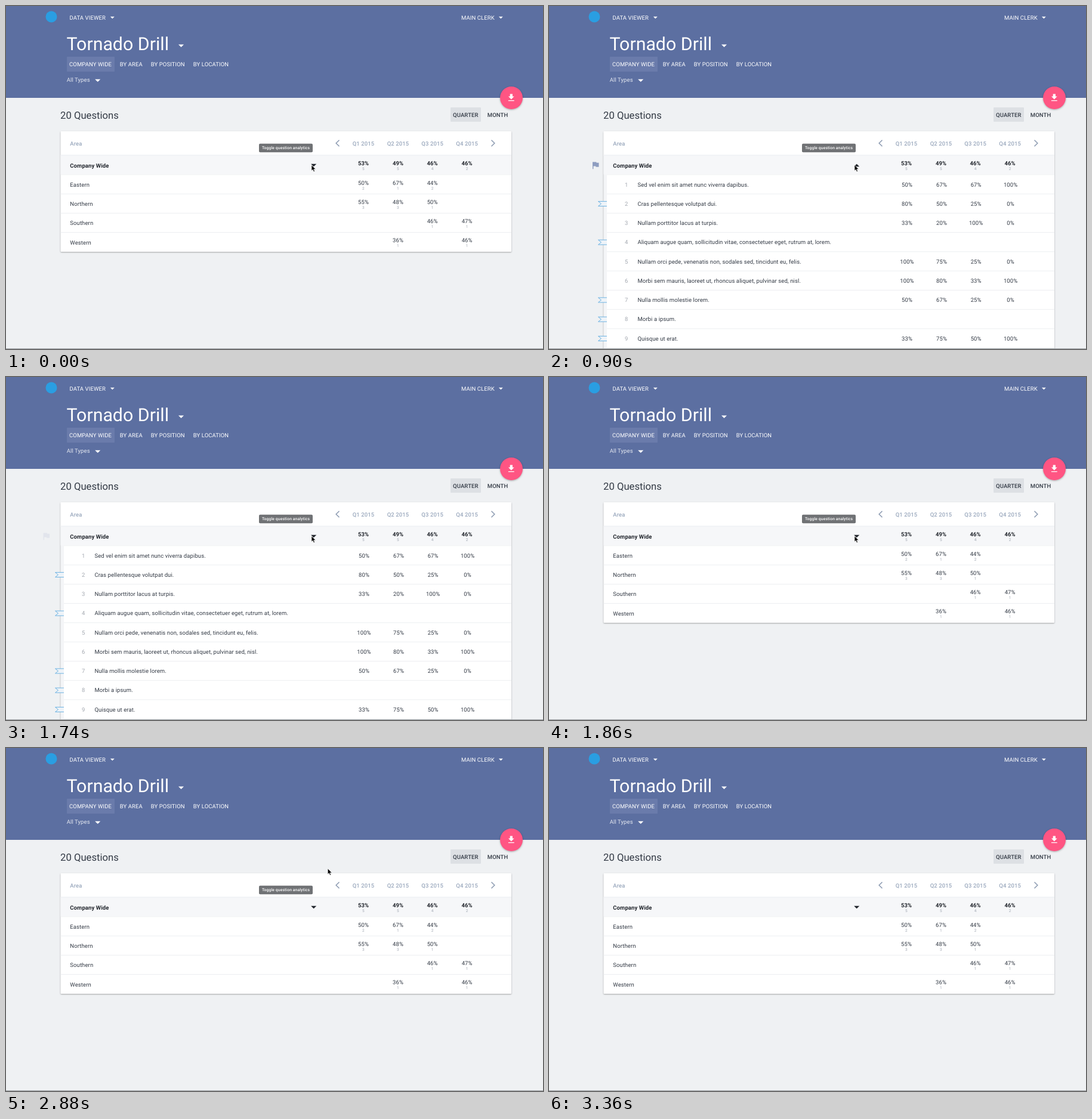
Animation, 900 px wide and 575 px high, one loop 3390 ms. Source, as an HTML page:

```html
<!DOCTYPE html>
<html lang="en">
<head>
<meta charset="utf-8">
<title>Data viewer</title>
<style>
  html, body { margin: 0; width: 100%; height: 100%; overflow: hidden; background: #eff1f3; }
  svg { display: block; width: 900px; height: 575px; }
  text { font: 9.5px Roboto, sans-serif; letter-spacing: .1px; fill: #343b46; text-rendering: geometricPrecision; }
  text.light { fill: #fff; }
  text.soft { fill: #e3e7f0; }
  text.muted { fill: #9aa8bd; font-weight: 500; }
  text.index { fill: #a3a8b0; }
  text.bold { font-weight: 700; fill: #23272e; }
  text.medium { font-weight: 500; }
  text.count { font-size: 6.5px; fill: #a0a7b2; }
  text.title { font-size: 30.3px; letter-spacing: 0; fill: #fff; }
  text.heading { font-size: 16.7px; letter-spacing: 0; }
  text.tip { font-size: 6.8px; font-weight: 500; fill: #fff; }
  .card { filter: drop-shadow(0 1px 1px rgba(0, 0, 0, .32)); }
  .fab { filter: drop-shadow(0 1.5px 1.5px rgba(0, 0, 0, .3)); }
</style>
</head>
<body>
<svg id="stage" viewBox="0 0 900 575"></svg>
<script>
const LOOP = 3390;
const COLUMNS = [599, 657, 714.6, 772.6];
const PITCH = 32.27;

const AREAS = [
  ['Eastern', '50% 2', '67% 1', '44% 2', ''],
  ['Northern', '55% 3', '48% 3', '50% 1', ''],
  ['Southern', '', '', '46% 1', '47% 1'],
  ['Western', '', '36% 1', '', '46% 1'],
];
const QUESTIONS = [
  ['Sed vel enim sit amet nunc viverra dapibus.', '50% 67% 67% 100%'],
  ['Cras pellentesque volutpat dui.', '80% 50% 25% 0%', true],
  ['Nullam porttitor lacus at turpis.', '33% 20% 100% 0%'],
  ['Aliquam augue quam, sollicitudin vitae, consectetuer eget, rutrum at, lorem.', '', true],
  ['Nullam orci pede, venenatis non, sodales sed, tincidunt eu, felis.', '100% 75% 25% 0%'],
  ['Morbi sem mauris, laoreet ut, rhoncus aliquet, pulvinar sed, nisl.', '100% 80% 33% 100%'],
  ['Nulla mollis molestie lorem.', '50% 67% 25% 0%', true],
  ['Morbi a ipsum.', '', true],
  ['Quisque ut erat.', '33% 75% 50% 100%', true],
];

const text = (x, y, str, cls = '', anchor = 'start') =>
  `<text x="${x}" y="${y}" class="${cls}" text-anchor="${anchor}">${str}</text>`;
const rect = (x, y, w, h, fill, more = '') =>
  `<rect x="${x}" y="${y}" width="${w}" height="${h}" fill="${fill}" ${more}/>`;
const path = (d, fill, more = '') => `<path d="${d}" fill="${fill}" ${more}/>`;
const caret = (x, y, r, fill, more = '') => path(`M${x - r} ${y - r / 2}h${2 * r}l${-r} ${r}z`, fill, more);
const separator = (x, row) => rect(x, 250 + PITCH * row, 847 - x, 1, '#eceef1');
const chevron = (x, dx) => path(`M${x} 224.7l${dx} 5.3l${-dx} 5.3`, 'none', 'stroke="#8f9db3" stroke-width="1.6"');

// A percentage with its small count below
const scores = (cells, row, cls = '') => cells.map((cell, i) => {
  if (!cell) return '';
  const [percent, count] = cell.split(' ');
  const y = 267.3 + PITCH * row;
  return text(COLUMNS[i], y, percent, cls, 'middle') + text(COLUMNS[i], y + 8.1, count, 'count', 'middle');
}).join('');

const header = () => rect(0, 0, 900, 154, '#5c6fa1') +
  '<circle cx="76" cy="18" r="9.5" fill="#2a9ee2"/>' +
  text(106.5, 23, 'DATA VIEWER', 'light') + caret(178.3, 19.5, 3.5, '#fff') +
  text(763, 23, 'MAIN CLERK', 'light') + caret(829.3, 19.5, 3.5, '#fff') +
  text(101.5, 74.2, 'Tornado Drill', 'title') + caret(293.5, 66.7, 4.6, '#fff') +
  rect(102, 85, 80, 25, '#6a7bab', 'rx="1"') +
  text(106, 101, 'COMPANY WIDE', 'light') + text(190.7, 101, 'BY AREA', 'light') +
  text(242.7, 101, 'BY POSITION', 'light') + text(313.7, 101, 'BY LOCATION', 'light') +
  text(101.7, 127.4, 'All Types', 'soft') + caret(153.7, 125, 4.6, '#fff') +
  '<circle class="fab" cx="847" cy="154" r="19" fill="#ff5583"/>' +
  path('M19 9h-4V3H9v6H5l7 7 7-7zM5 18v2h14v-2z', '#fff', 'transform="translate(838.4 145.3) scale(.7)"');

const toolbar = () => text(91, 189, '20 Questions', 'heading') +
  rect(745, 170, 51, 24, '#dde0e4', 'rx="1"') +
  text(770.3, 186, 'QUARTER', 'medium', 'middle') + text(824, 186, 'MONTH', 'medium', 'middle');

const areaRows = () => rect(91.5, 210, 755.5, 202, '#fff', 'class="card" rx="1"') +
  AREAS.map(([name, ...cells], i) => separator(91.5, i + 1) +
    text(107.3, 302.8 + PITCH * i, name) + scores(cells, i + 1)).join('');

const ribbon = y => path(`M97 ${y - 4}H82.5l5 4l-5 4H97`, '#eef3f8', 'stroke="#6db3e2"');

const questionRows = () => rect(91.5, 210, 755.5, 380, '#f4f5f7', 'class="card" rx="1"') +
  rect(91.5, 210, 755.5, 41, '#fff') + rect(97, 282, 750, 300, '#fff') +
  QUESTIONS.map(([question, values, marked], i) => {
    const y = 302.6 + PITCH * i;
    return separator(97, i + 1) + (marked ? ribbon(y - 3.3) : '') +
      text(132.5, y, i + 1, 'index', 'end') + text(148.4, y, question) +
      values.split(' ').map((v, c) => text(COLUMNS[c] + 1, y, v, '', 'middle')).join('');
  }).join('') + separator(97, 10);

const summary = () => rect(91.5, 250, 755.5, 32.3, '#f6f7f9') + rect(91.5, 249.5, 755.5, 1, '#eceef1') +
  text(107.3, 234.2, 'Area', 'muted') + chevron(558.5, -5.3) + chevron(813.5, 5.3) +
  COLUMNS.map((x, i) => text(x, 234.2, `Q${i + 1} 2015`, 'muted', 'middle')).join('') +
  text(107.3, 270.5, 'Company Wide', 'bold') + scores(['53% 5', '49% 5', '46% 4', '46% 2'], 0, 'bold') +
  caret(515.7, 267, 4.6, '#23272e', 'id="toggle"');

const overlay = () =>
  path('M14.4 6L14 4H5v17h2v-7h5.6l.4 2h7V6z', '#8e9dc0', 'id="flag"') +
  `<g id="tooltip">${rect(424, 230.7, 90, 14.5, '#707275', 'rx="2"')}${text(469, 240.4, 'Toggle question analytics', 'tip', 'middle')}</g>` +
  path('M0 0v9.8l2.2-2 1.6 3.6 1.7-.8-1.6-3.4h3.2z', '#000', 'id="cursor" stroke="#fff" stroke-width=".7"') +
  rect(0, 574, 900, 1, '#969a9e');

document.getElementById('stage').innerHTML = header() + toolbar() +
  `<g id="areas">${areaRows()}</g><g id="questions">${questionRows()}</g>` + summary() + overlay();

const [areas, questions, toggle, flag, tooltip, cursor] =
  ['areas', 'questions', 'toggle', 'flag', 'tooltip', 'cursor'].map(id => document.getElementById(id));
const progress = (t, from, to) => Math.min(1, Math.max(0, (t - from) / (to - from)));
const show = (el, on) => el.setAttribute('visibility', on ? 'visible' : 'hidden');

function draw(t) {
  const listed = t >= 690 && t < 1800;
  show(areas, !listed);
  show(questions, listed);

  const opened = t >= 660 && t < 1650;
  toggle.setAttribute('transform', opened ? 'rotate(180 515.7 267)' : '');

  const shown = progress(t, 690, 850) * (1 - progress(t, 1650, 1755));
  flag.setAttribute('transform', `translate(${57.5 + 12 * shown} 258.6) scale(.7)`);
  flag.setAttribute('opacity', shown);

  tooltip.setAttribute('opacity', 1 - progress(t, 2940, 3090));

  const away = progress(t, 2760, 3330);
  cursor.setAttribute('transform', `translate(${512 + 128 * away} ${266.5 - 304 * away})`);
}

function tick() {
  draw(performance.now() % LOOP);
  requestAnimationFrame(tick);
}
tick();
</script>
</body>
</html>
```
